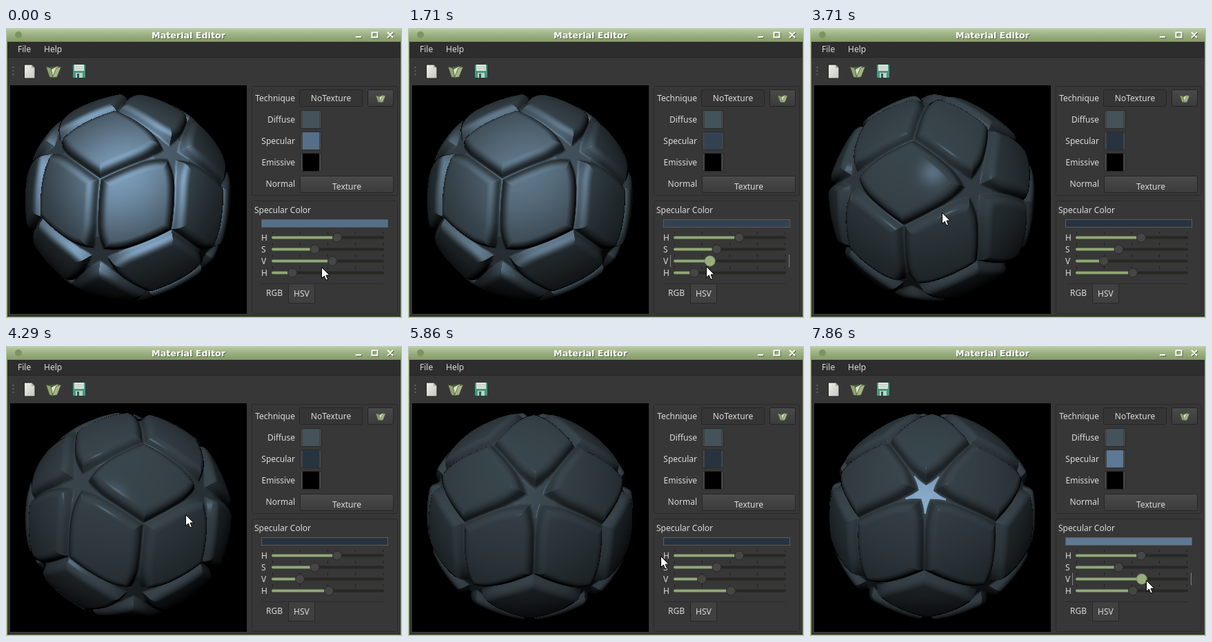
An HTML page with a canvas for the animation above (8 s loop, 574 px wide and 420 px high).

```html
<!DOCTYPE html>
<html lang="en">
<head>
<meta charset="utf-8">
<title>Material Editor</title>
<style>
  html, body { margin: 0; width: 100%; height: 100%; overflow: hidden; background: #373737; }
  svg, canvas { position: absolute; left: 0; top: 0; }
  canvas { left: 6px; top: 83px; }
  text { font: 12px "Noto Sans", "Open Sans", sans-serif; fill: #dcdcdc; }
  .title { font: bold 12.7px "DejaVu Sans", sans-serif; text-anchor: middle; }
  .end { text-anchor: end; }
  .mid { text-anchor: middle; }
</style>
</head>
<body>
<svg id="ui" width="574" height="420" viewBox="0 0 574 420">
  <defs>
    <linearGradient id="bar" x2="0" y2="1">
      <stop offset="0" stop-color="#c4d2b2"/><stop offset=".15" stop-color="#b1c39b"/>
      <stop offset=".5" stop-color="#9cb182"/><stop offset="1" stop-color="#84996a"/>
    </linearGradient>
    <linearGradient id="btn" x2="0" y2="1">
      <stop offset="0" stop-color="#4a4a4a"/><stop offset="1" stop-color="#3b3b3b"/>
    </linearGradient>
    <linearGradient id="sheet" x2="1" y2="1">
      <stop offset="0" stop-color="#f0f0ec"/><stop offset="1" stop-color="#c3c6bd"/>
    </linearGradient>
    <g id="folder">
      <path d="M2 5 20 3 15 19 7 20Z" fill="#4f6138"/>
      <path d="M8 8 16 4 18 5 13 19 8 19Z" fill="#dedfc8"/>
      <path d="M0 4 7 6 10 20 5 19Z" fill="#8fa372" stroke="#39472a" stroke-width=".7"/>
      <path d="M15 6 22 4 16 19 9 20Z" fill="#a3b586" stroke="#39472a" stroke-width=".7"/>
    </g>
  </defs>

  <rect width="574" height="420" fill="#8ea375"/>
  <rect width="574" height="20" fill="url(#bar)"/>
  <path d="M.5 0V419.500H573.500V0" fill="none" stroke="#bccbaa"/>
  <rect x="2" y="20" width="570" height="398" fill="#373737"/>
  <rect x="2" y="20" width="570" height="22" fill="#2d2d2d"/>
  <path d="M2 42.500H572" stroke="#262626"/>
  <path d="M2 417.500H572" stroke="#252525"/>
  <circle cx="18" cy="10" r="5" fill="#7c9560"/>
  <text class="title" x="265.500" y="15.500" style="fill:#52623f">Material Editor</text>
  <text class="title" x="264.500" y="14.500" style="fill:#fff">Material Editor</text>
  <g fill="none" stroke="#566742" stroke-width="2" transform="translate(1 1)">
    <path id="wm" d="M507 13H515M530.500 6.500H538.500V13.500H530.500ZM553 6 561 14M561 6 553 14"/>
  </g>
  <use href="#wm" fill="none" stroke="#fff" stroke-width="2"/>
  <text x="17" y="35">File</text>
  <text x="55" y="35">Help</text>

  <path d="M10.500 56V70" stroke="#666" stroke-width="2" stroke-dasharray="2 3"/>
  <path d="M26.500 53H37L42 58V73H26.500Z" fill="url(#sheet)" stroke="#1f1f1f"/>
  <path d="M37 53V58H42Z" fill="#aeb1a8"/>
  <use href="#folder" x="58" y="52"/>
  <rect x="96.500" y="52.500" width="19" height="20" rx="2" fill="#4b9682" stroke="#1c4038"/>
  <rect x="99" y="53" width="14" height="9" fill="#dfe6dc"/>
  <path d="M100 56H112M100 59H112" stroke="#b3c0b0"/>
  <rect x="101" y="65" width="10" height="7" fill="#bfd0c8"/>
  <rect x="103" y="66" width="3" height="6" fill="#295c50"/>

  <g fill="none" stroke="#2a2a2a">
    <rect x="356.500" y="84.500" width="211" height="158" rx="2"/>
    <rect x="356.500" y="250.500" width="211" height="163" rx="2"/>
  </g>
  <text class="end" x="419" y="106">Technique</text>
  <text class="end" x="419" y="137">Diffuse</text>
  <text class="end" x="419" y="168">Specular</text>
  <text class="end" x="419" y="199">Emissive</text>
  <text class="end" x="419" y="230">Normal</text>
  <rect x="425.500" y="89.500" width="91" height="24" rx="2" fill="#353535" stroke="#262626"/>
  <text class="mid" x="471" y="106">NoTexture</text>
  <rect x="524.500" y="89.500" width="37" height="24" rx="2" fill="url(#btn)" stroke="#232323"/>
  <use href="#folder" transform="translate(536 95) scale(.65)"/>
  <rect x="426.500" y="214.500" width="135" height="24" rx="2" fill="url(#btn)" stroke="#262626"/>
  <text class="mid" x="494" y="234">Texture</text>
  <g id="swatches"></g>

  <text x="360" y="268">Specular Color</text>
  <rect id="chip" x="370.500" y="277.500" width="183" height="11" stroke="#5c5c5c"/>
  <path d="M386.500 295V362M426.500 295V362M466.500 295V362M506.500 295V362M546.500 295V362"
        stroke="#202020" stroke-dasharray="4 13" stroke-dashoffset="1"/>
  <g id="sliders"></g>
  <path d="M371 370.500H547" stroke="#2a2a2a"/>
  <rect x="409.500" y="370.500" width="38" height="28" fill="#404040" stroke="#282828"/>
  <text x="377" y="388">RGB</text>
  <text x="417" y="389">HSV</text>
</svg>
<canvas id="view" width="343" height="331"></canvas>
<svg width="574" height="420" viewBox="0 0 574 420">
  <path id="cursor" d="M0 0V16L3.800 12.600 6.400 18.600 9 17.500 6.500 11.600H11.500Z" fill="#fff" stroke="#000"/>
</svg>

<script>
const LOOP = 8000, CX = 177, CY = 247, CAM = 3.8, FOCAL = 543, FLOOR = 0.95;
const $ = id => document.getElementById(id);

// ---------- timelines: [ms, values...] ----------
const pointer = [[0, 457, 346], [140, 457, 346], [430, 467, 344], [1140, 455, 344], [2000, 421, 345],
  [2290, 419, 357], [2570, 447, 358], [2860, 472, 358], [3000, 215, 175], [3710, 190, 267],
  [4860, 330, 221], [5860, 366, 304], [6290, 342, 294], [6570, 470, 350], [6860, 432, 340],
  [7000, 432, 339], [7860, 487, 339]];
const value = [[430, 473], [1140, 461], [2000, 426], [7000, 426], [7860, 481]];
const hardness = [[2290, 415], [2570, 443], [2860, 468]];
// screen places of a three-fold corner and, for the roll, a neighbouring five-fold one
const pose = [[3000, 137, 219, 74, 174], [3710, 136, 286, 64, 221], [4860, 262, 228, 160, 180],
  [5860, 280, 259, 182, 218], [6290, 268, 255, 170, 213]];

function at(keys, t) {
  let i = 0;
  while (i < keys.length - 1 && keys[i + 1][0] <= t) i++;
  const a = keys[i], b = keys[i + 1] || a;
  const k = b === a ? 0 : Math.max(0, (t - a[0]) / (b[0] - a[0]));
  return a.slice(1).map((v, j) => v + (b[j + 1] - v) * k);
}

// ---------- vectors ----------
const dot = (a, b) => a[0] * b[0] + a[1] * b[1] + a[2] * b[2];
const cross = (a, b) => [a[1] * b[2] - a[2] * b[1], a[2] * b[0] - a[0] * b[2], a[0] * b[1] - a[1] * b[0]];
const unit = a => a.map(v => v / Math.hypot(...a));

function basis(a, near) {
  const k = dot(a, near), b = unit(near.map((v, i) => v - k * a[i]));
  return [a, b, cross(a, b)];
}

// direction of the ball point seen at a screen place
function aim(x, y) {
  const d = unit([(x - CX) / FOCAL, (CY - y) / FOCAL, -1]);
  const b = CAM * d[2], q = b * b - CAM * CAM + FLOOR * FLOOR;
  const t = -b - Math.sqrt(Math.max(0, q));
  return unit([d[0] * t, d[1] * t, CAM + d[2] * t]);
}

// ---------- ball: thirty raised rhombic plates ----------
const BODY = basis([0, 0.3568, 0.9342], [0.5257, 0, 0.8507]);
const LIGHT = unit([-0.12, 0.41, 0.9]);

function smax(a, b, k) {
  const h = Math.max(k - Math.abs(a - b), 0);
  return Math.max(a, b) + h * h / (4 * k);
}

function dist(x, y, z) {
  // fold into one quarter of a plate around +z
  for (let i = 0; i < 5; i++) {
    x = Math.abs(x); y = Math.abs(y); z = Math.abs(z);
    const e = 0.5 * x + 0.80902 * y - 0.30902 * z;
    if (e <= 0) break;
    x -= e; y -= 1.61803 * e; z += 0.61803 * e;
  }
  const height = Math.sqrt(x * x + y * y + z * z) - FLOOR, rise = height * 0.85;
  const floor = Math.max(height, 0.5257 * x + 0.8507 * z - FLOOR * 0.985);
  const top = Math.sqrt(x * x + y * y + (z + 0.5) * (z + 0.5)) - 1.497;
  const edge = (0.5 * x + 0.80902 * y - 0.30902 * z + rise + 0.004) * 0.76;
  const cut = (0.847 * (0.085 + 0.8507 * x - 0.5257 * z) + 0.53 * y + rise) * 0.76;
  const plate = smax(smax(edge, cut, 0.03), top, 0.04);
  return -smax(-plate, -floor, 0.01);
}

const view = $("view"), ctx = view.getContext("2d");
const W = view.width, H = view.height, image = ctx.createImageData(W, H);
const lambert = new Float32Array(W * H), gloss = new Float32Array(W * H);

// stores the light terms of every pixel for one pose
function trace([tx, ty, sx, sy]) {
  const eye = basis(aim(tx, ty), aim(sx, sy));
  const toBody = v => {
    const c = eye.map(e => dot(e, v));
    return [0, 1, 2].map(i => BODY[0][i] * c[0] + BODY[1][i] * c[1] + BODY[2][i] * c[2]);
  };
  const X = toBody([1, 0, 0]), Y = toBody([0, 1, 0]), Z = toBody([0, 0, 1]), L = toBody(LIGHT);
  const ox = Z[0] * CAM, oy = Z[1] * CAM, oz = Z[2] * CAM, E = 0.003;
  for (let j = 0, n = 0; j < H; j++) for (let i = 0; i < W; i++, n++) {
    lambert[n] = -1;
    let u = (i + 6.5 - CX) / FOCAL, v = (CY - j - 83.5) / FOCAL;
    const w = 1 / Math.sqrt(u * u + v * v + 1);
    u *= w; v *= w;
    const q = CAM * CAM * w * w - CAM * CAM + 1.1;
    if (q < 0) continue;
    const dx = X[0] * u + Y[0] * v - Z[0] * w;
    const dy = X[1] * u + Y[1] * v - Z[1] * w;
    const dz = X[2] * u + Y[2] * v - Z[2] * w;
    const root = Math.sqrt(q), far = CAM * w + root;
    let t = CAM * w - root, d = 1;
    for (let k = 0; k < 26 && t < far; k++) {
      d = dist(ox + dx * t, oy + dy * t, oz + dz * t);
      if (d < 0.0015) break;
      t += d;
    }
    if (d > 0.006) continue;
    const x = ox + dx * t, y = oy + dy * t, z = oz + dz * t;
    d = dist(x, y, z);
    const nx = dist(x + E, y, z) - d, ny = dist(x, y + E, z) - d, nz = dist(x, y, z + E) - d;
    const len = Math.sqrt(nx * nx + ny * ny + nz * nz) || 1;
    const hx = L[0] - dx, hy = L[1] - dy, hz = L[2] - dz;
    lambert[n] = Math.max(0, (nx * L[0] + ny * L[1] + nz * L[2]) / len);
    gloss[n] = Math.max(1e-4, (nx * hx + ny * hy + nz * hz) / len / Math.sqrt(hx * hx + hy * hy + hz * hz));
  }
}

function shade(spec, power) {
  const px = image.data;
  for (let n = 0, o = 0; n < W * H; n++, o += 4) {
    const l = lambert[n], s = l > 0 ? 0.85 * Math.exp(power * Math.log(gloss[n])) : 0;
    const k = Math.max(0, l);
    px[o] = 58 * k + spec[0] * s;
    px[o + 1] = 70 * k + spec[1] * s;
    px[o + 2] = 77 * k + spec[2] * s;
    px[o + 3] = 255;
  }
  ctx.putImageData(image, 0, 0);
}

function hsv(h, s, v) {
  return [5, 3, 1].map(n => {
    const k = (n + h * 6) % 6;
    return Math.round(255 * v * (1 - s * Math.max(0, Math.min(k, 4 - k, 1))));
  });
}

// ---------- controls ----------
$("swatches").innerHTML = ["#44525a", "#546f8c", "#000"].map((c, i) => {
  const y = 119.5 + 31 * i;
  return `<rect x="426.5" y="${y}" width="31" height="26" rx="2" fill="#434343" stroke="#2a2a2a"/>
    <rect x="430" y="${y + 0.5}" width="24" height="25" fill="${c}"/>`;
}).join("");
const specSwatch = $("swatches").children[3];

$("sliders").innerHTML = ["H", "S", "V", "H"].map((name, i) => {
  const y = 303.5 + 17 * i;
  return `<g><text x="370" y="${y + 4.5}">${name}</text>
    <path d="M387 ${y}H546" stroke="#272822" stroke-width="4" stroke-linecap="round"/>
    <path stroke="#92a878" stroke-width="4" stroke-linecap="round"/>
    <path d="M380.5 ${y - 8.5}v17M552.5 ${y - 8.5}v17" stroke="#ccc" stroke-dasharray="1 1"/>
    <circle cy="${y}"/></g>`;
}).join("");
const sliders = [...$("sliders").children];

function setSlider(i, x, active) {
  const [, , fill, focus, knob] = sliders[i].children;
  fill.setAttribute("d", `M387 ${303.5 + 17 * i}H${x}`);
  focus.setAttribute("visibility", active ? "visible" : "hidden");
  knob.setAttribute("cx", x);
  knob.setAttribute("r", active ? 7.5 : 6.5);
  knob.setAttribute("fill", active ? "#99ad80" : "#464646");
  knob.setAttribute("stroke", active ? "#7d9163" : "#292929");
}

let lastPose = "", lastLook = "";
function draw(t) {
  const [v] = at(value, t), [h] = at(hardness, t), [mx, my] = at(pointer, t);
  const level = x => (x - 386.5) / 160;
  setSlider(0, 480, false);
  setSlider(1, 447.5, false);
  setSlider(2, v, t > 420 && t < 2200 || t > 6990);
  setSlider(3, h, t > 2200 && t < 2990);

  const spec = hsv(level(480), level(447.5), level(v)), css = `rgb(${spec})`;
  $("chip").setAttribute("fill", css);
  specSwatch.setAttribute("fill", css);
  $("cursor").setAttribute("transform", `translate(${Math.round(mx) + 0.5} ${Math.round(my) + 0.5})`);

  const p = at(pose, t), poseKey = p.join(), look = poseKey + css + h;
  if (poseKey !== lastPose) trace(p);
  if (look !== lastLook) shade(spec, 2 ** (level(h) * 16));
  lastPose = poseKey;
  lastLook = look;
}

// the picture advances seven times a second
let lastStep = -1;
const start = performance.now();
function tick() {
  const t = (performance.now() - start) % LOOP;
  const step = Math.min(55, Math.floor((t + 4) * 0.007));
  if (step !== lastStep) draw(step * 1000 / 7);
  lastStep = step;
  requestAnimationFrame(tick);
}
tick();
</script>
</body>
</html>
```
